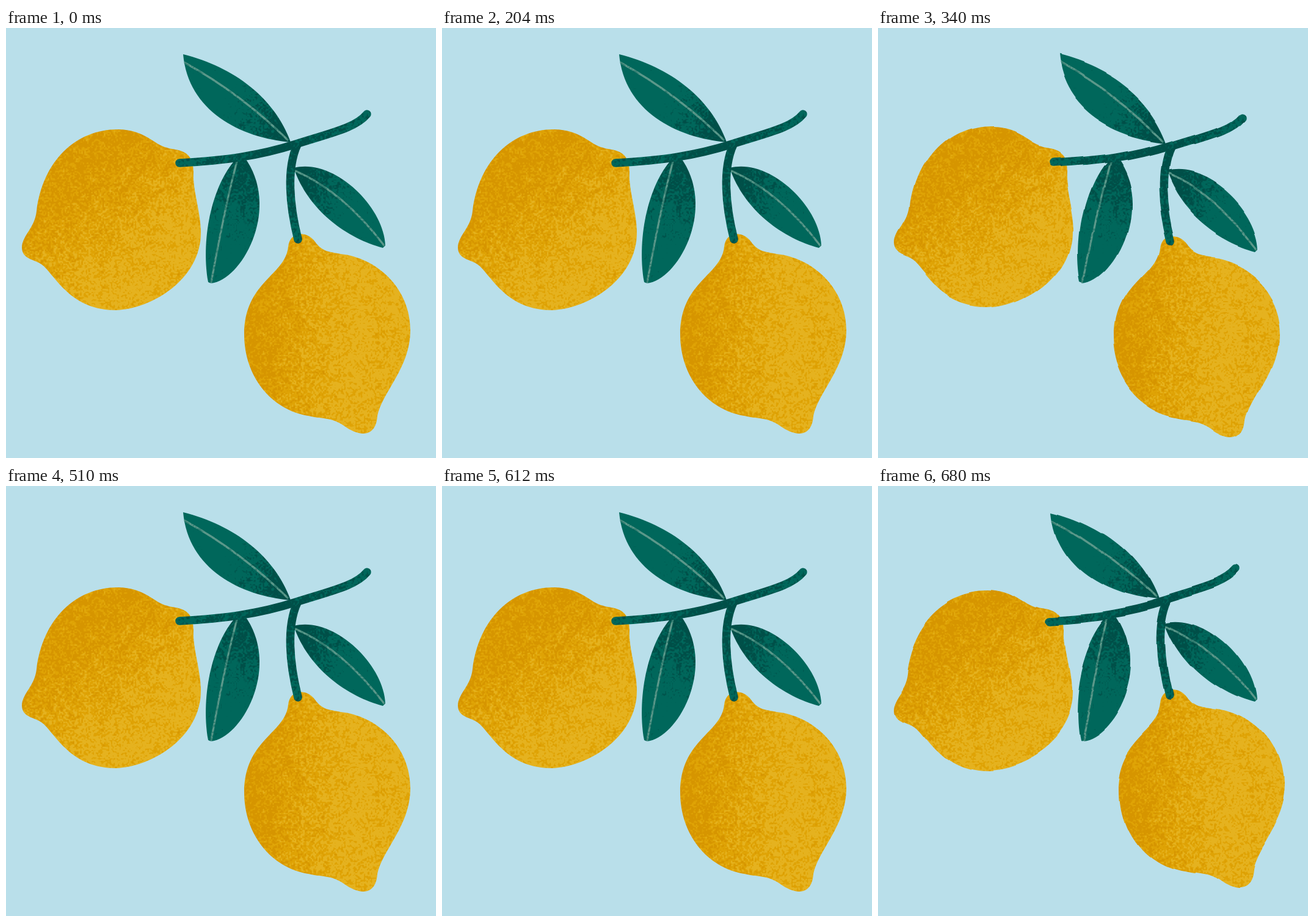
Animation, 704 px wide and 704 px high, one loop 850 ms. Source, as an HTML page with a canvas:

```html
<!DOCTYPE html>
<html lang="en">
<head>
<meta charset="utf-8">
<title>Lemon branch</title>
<style>
  html, body { margin: 0; width: 100%; height: 100%; overflow: hidden; background: #b9dfea; }
  canvas { display: block; width: 100vw; height: 100vh; }
</style>
</head>
<body>
<canvas id="stage" width="704" height="704"></canvas>
<script>
const SIZE = 704;
const SKY = '#b9dfea';
const LOOP = 850;
const BEAT = 170;
const SWAY = 1.57; // degrees

// Colours from light to dark, and the shade levels between which each pair blends.
const LEMON = { stops: [[229, 178, 31], [223, 163, 5], [214, 149, 0]], edges: [[.25, .4], [.54, .74]] };
const LEAF = { stops: [[0, 103, 91], [0, 79, 72]], edges: [[.36, .64]] };
const VEIN = { stops: [[92, 152, 138], [48, 124, 111]], edges: [[.4, .7]] };

const clamp = (v, lo, hi) => Math.min(hi, Math.max(lo, v));
const lerp = (a, b, t) => a + (b - a) * t;

function makeCanvas() {
  const c = document.createElement('canvas');
  c.width = c.height = SIZE;
  return c;
}

function makeRandom(seed) {
  return () => {
    seed = (seed + 0x6D2B79F5) | 0;
    let t = Math.imul(seed ^ (seed >>> 15), 1 | seed);
    t = (t + Math.imul(t ^ (t >>> 7), 61 | t)) ^ t;
    return ((t ^ (t >>> 14)) >>> 0) / 4294967296;
  };
}

// Random values on a grid of the given cell size, blended in between.
function makeNoise(cell, seed) {
  const rand = makeRandom(seed);
  const cols = Math.ceil(SIZE / cell) + 2;
  const grid = Float32Array.from({ length: cols * cols }, () => rand() - .5);
  return (x, y) => {
    const gx = x / cell, gy = y / cell;
    const i = Math.floor(gy) * cols + Math.floor(gx);
    const fx = gx % 1, fy = gy % 1;
    return lerp(lerp(grid[i], grid[i + 1], fx), lerp(grid[i + cols], grid[i + cols + 1], fx), fy);
  };
}

const fine = makeNoise(2.3, 71);
const broad = makeNoise(9, 5);
const grain = (x, y) => .85 * fine(x, y) + .3 * broad(x, y);

// Shade that falls from one level to another along a line.
function ramp(x0, y0, x1, y1, from, to) {
  const dx = x1 - x0, dy = y1 - y0;
  const len2 = dx * dx + dy * dy;
  return (x, y) => lerp(from, to, clamp(((x - x0) * dx + (y - y0) * dy) / len2, 0, 1));
}

const art = makeCanvas();
const artCtx = art.getContext('2d');

// Fills an outline, or strokes it when a width is given, then colours it by shade and grain.
function paint(outline, palette, shade, width) {
  const layer = makeCanvas();
  const ctx = layer.getContext('2d', { willReadFrequently: true });
  const path = new Path2D(outline);
  ctx.lineCap = 'round';
  ctx.lineWidth = width || 1;
  if (width) ctx.stroke(path);
  else ctx.fill(path);

  const img = ctx.getImageData(0, 0, SIZE, SIZE);
  const px = img.data;
  for (let y = 0; y < SIZE; y++) {
    for (let x = 0; x < SIZE; x++) {
      const p = 4 * (y * SIZE + x);
      if (!px[p + 3]) continue;
      const level = shade(x, y) + grain(x, y);
      const k = palette.edges.length > 1 && level > palette.edges[1][0] ? 1 : 0;
      const [lo, hi] = palette.edges[k];
      const mix = clamp((level - lo) / (hi - lo), 0, 1);
      for (let c = 0; c < 3; c++) px[p + c] = lerp(palette.stops[k][c], palette.stops[k + 1][c], mix);
    }
  }
  ctx.putImageData(img, 0, 0);
  artCtx.drawImage(layer, 0, 0);
}

function paintLeaf(outline, vein, shade) {
  paint(outline, LEAF, shade);
  paint(vein, VEIN, () => .42, 3.2);
}

// Upper, hanging and right leaf
paintLeaf('M290 43 C374 64 440 115 466 187 C384 180 298 136 290 43Z',
  'M293 57 Q385 108 461 183', ramp(460, 160, 355, 130, .8, .03));
paintLeaf('M380 211 C340 250 318 340 331 416 Q335 419 341 417 C390 406 450 292 390 211Z',
  'M379 215 Q360 285 336 416', ramp(405, 240, 345, 345, .72, .06));
paintLeaf('M471 229 C535 212 618 290 621 356 L617 360 C560 345 495 300 471 229Z',
  'M474 234 Q552 268 619 356', ramp(485, 240, 575, 290, .8, .05));

// Left and right lemon
paint(`M183 166 C228 166 243 192 264 196 C275 201 307 195 307 235 C305 265 319 300 319 335
  C319 412 238 460 180 462 C110 462 85 413 62 390 C50 378 27 381 26 360
  C26 340 47 328 50 300 C60 218 114 166 183 166Z`,
  LEMON, ramp(125, 235, 225, 370, .72, .24));
paint(`M548 370 C606 376 662 425 662 495 C662 556 616 596 608 635 C606 668 582 672 553 651
  C533 637 515 640 495 635 C434 625 390 570 390 502 C390 415 458 405 462 358
  C465 332 493 332 506 350 C518 367 530 366 548 370Z`,
  LEMON, ramp(410, 500, 555, 510, .74, .23));

// Stem and branch
paint('M477 191 C459 230 464 290 478 346', LEAF, ramp(470, 200, 476, 340, .75, .4), 13.5);
paint('M284 221 C360 217 415 209 475 190 C535 171 573 163 591 141', LEAF,
  x => .8 - Math.abs(x - 445) / 320, 13.5);

const view = document.getElementById('stage').getContext('2d');
let shown = null;

function show(tilt) {
  if (tilt === shown) return;
  shown = tilt;
  view.setTransform(1, 0, 0, 1, 0, 0);
  view.fillStyle = SKY;
  view.fillRect(0, 0, SIZE, SIZE);
  view.imageSmoothingEnabled = false;
  view.translate(SIZE / 2, SIZE / 2);
  view.rotate(tilt * Math.PI / 180);
  view.drawImage(art, -SIZE / 2, -SIZE / 2);
}

// Two beats upright, one to the right, one upright, one to the left.
function tiltAt(ms) {
  const beat = Math.floor((ms % LOOP) / BEAT);
  return beat === 2 ? SWAY : beat === 4 ? -SWAY : 0;
}

const start = performance.now();

function tick() {
  show(tiltAt(performance.now() - start));
  requestAnimationFrame(tick);
}
tick();
</script>
</body>
</html>
```
